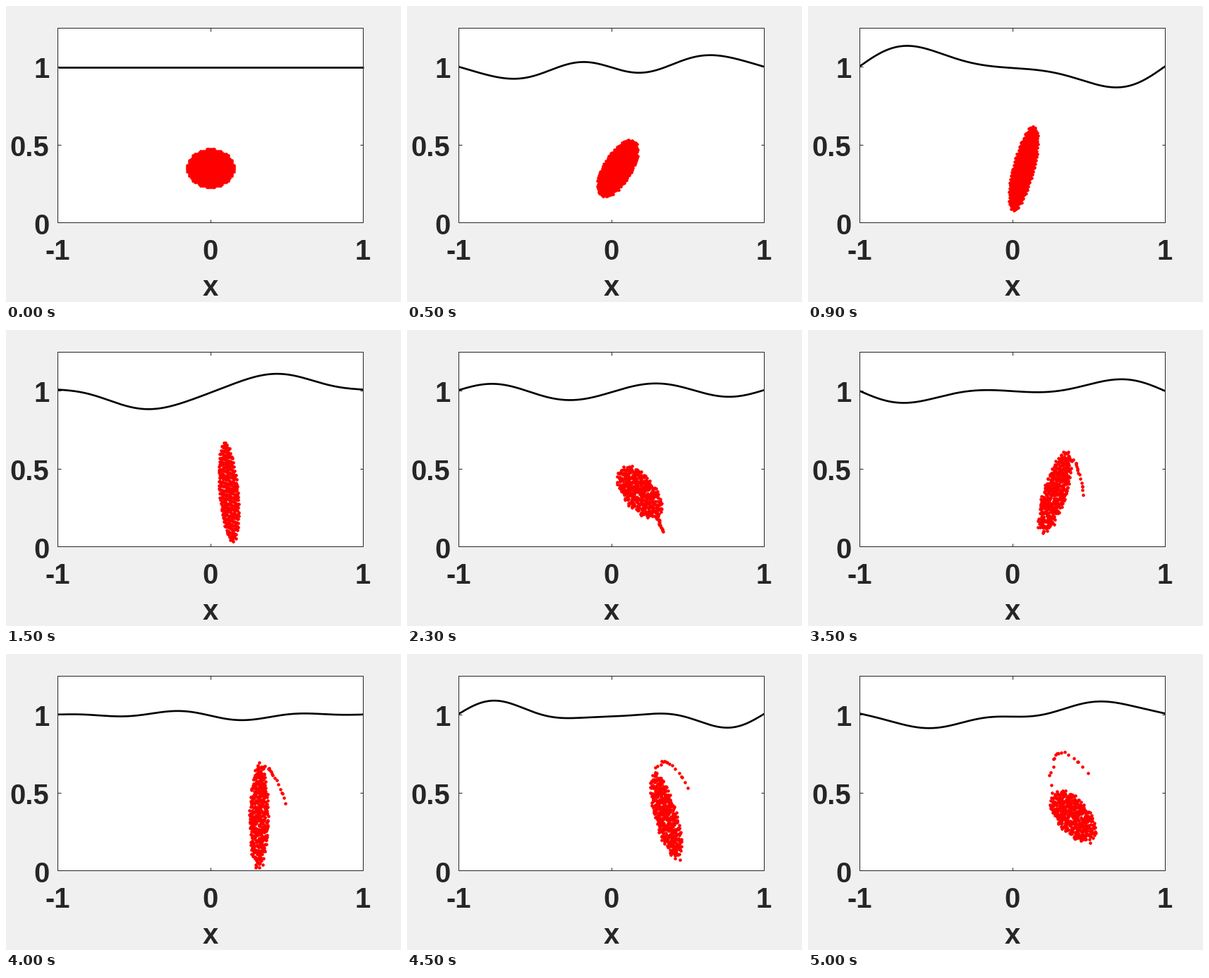
A matplotlib script that plays this animation: 560x420 px, repeating every 5.1 s.

```python
import numpy as np
import matplotlib.pyplot as plt
from matplotlib.animation import FuncAnimation

W, H, DPI = 560, 420, 100
PT = 72 / DPI                      # points per pixel
FRAMES, STEP = 51, 100
INK = "#262626"
LEFT, RIGHT, TOP, BOTTOM = 73, 506, 31, 307
MID, SX, SY = 290.0, 216.5, 220.8  # data to pixel scale
rng = np.random.default_rng(4)


def to_px(x, y):
    return MID + SX * x, BOTTOM + 0.5 - SY * y


def ease(t, start, end):
    u = np.clip((t - start) / (end - start), 0, 1)
    return u * u * (3 - 2 * u)


# Surface: standing waves that start from rest level, with water-wave dispersion
GRAVITY, DEPTH = 12.5, 0.328
SWELL = np.array([0.107, 0.050, 0.018])
K = np.pi * np.arange(1, 4)
OMEGA = np.sqrt(GRAVITY * K * np.tanh(K * DEPTH))
xs = np.linspace(-1, 1, 301)


def surface(t):
    waves = (SWELL * np.sin(OMEGA * t)) @ np.sin(np.outer(K, xs))
    return 1 + waves - 0.005 * (1 - np.cos(1.9 * t)) * np.cos(np.pi * xs)


# Blob: a disc of dots that drifts right while its strain turns in a circle
RADIUS, DRIFT, TURN = 0.136, 0.079, 2.34
gx, gy = np.meshgrid(np.linspace(-1, 1, 25), np.linspace(-1, 1, 25))
inside = gx ** 2 + gy ** 2 <= 1.03
DISC = RADIUS * np.array([gx[inside], gy[inside]])
NOISE = rng.normal(0, 0.007, DISC.shape)


def strain(t, q):
    """Stretch points q about the blob centre, keeping area; returns pixels."""
    a = -0.37 + 0.48 * np.cos(TURN * t)
    b = 0.39 * np.sin(TURN * t)
    e = np.hypot(a, b)
    c, s = np.cosh(e), np.sinh(e) / e
    x, y = np.array([[c + s * a, s * b], [s * b, c - s * a]]) @ q
    return np.array(to_px(DRIFT * t + x, 0.35 + y))


def blob(t):
    return strain(t, DISC + NOISE * ease(t, 1.1, 2.3))


# Tail: dots on a curve from the turning blob edge to a rising tip
s = np.linspace(0, 1, 20)
s[1:-1] += rng.normal(0, 0.02, 18)
SCATTER = rng.normal(0, 1.3, (2, 20))


def tail(t):
    u = t - 2.3
    angle = np.radians(83 * u - 50)
    root = strain(t, 0.95 * RADIUS * np.array([[np.cos(angle)], [np.sin(angle)]]))
    bend = np.array([[357 + 46 * u - 20.5 * u * u], [274 - 85 * u + 6.5 * u * u]])
    tip = np.array([[363 + 31 * u - 6.8 * u * u], [286 - 43.5 * u]])
    curve = (1 - s) ** 2 * root + 2 * s * (1 - s) * bend + s * s * tip
    return root + (curve - root + SCATTER * (1 - s)) * ease(t, 1.6, 2.3)


fig = plt.figure(figsize=(W / 100, H / 100), dpi=DPI, facecolor="#f0f0f0")
ax = fig.add_axes([0, 0, 1, 1])
ax.set(xlim=(0, W), ylim=(H, 0))
ax.axis("off")
ax.add_patch(plt.Rectangle((LEFT, TOP), RIGHT - LEFT, BOTTOM - TOP, fc="white", ec="none"))


def rule(x, y):
    ax.plot(x, y, color=INK, lw=PT, solid_capstyle="butt", zorder=4)


def label(x, y, text, ha="center"):
    ax.text(x, y, text, ha=ha, va="baseline", color=INK, family="Liberation Sans",
            weight="bold", size=40 * PT)


rule([LEFT, RIGHT, RIGHT, LEFT, LEFT], [TOP, TOP, BOTTOM, BOTTOM, TOP])
for edge, inner in ((TOP, 5), (BOTTOM, -4)):
    rule([MID, MID], [edge, edge + inner])
for y in (0.5, 1):
    row = int(to_px(0, y)[1])
    rule([LEFT, LEFT + 5], [row, row])
    rule([RIGHT, RIGHT - 4], [row, row])
for y, text in ((0, "0"), (0.5, "0.5"), (1, "1")):
    label(61.4, 324 - 222 * y, text, "right")
for x in (-1, 0, 1):
    label(289.4 + SX * x, 360.5, str(x))
label(289.7, 411, "x")

wave, = ax.plot([], [], color="black", lw=2.67 * PT, solid_capstyle="butt", zorder=3)
dots, = ax.plot([], [], "o", color="red", ms=4.6 * PT, mew=0, zorder=2)


def draw(i):
    t = i * STEP / 1000
    wave.set_data(*to_px(xs, surface(t)))
    dots.set_data(*np.hstack([blob(t), tail(t)]))
    return wave, dots


anim = FuncAnimation(fig, draw, frames=FRAMES, interval=STEP, repeat=True,
                     repeat_delay=0, blit=False)
plt.show()
```
